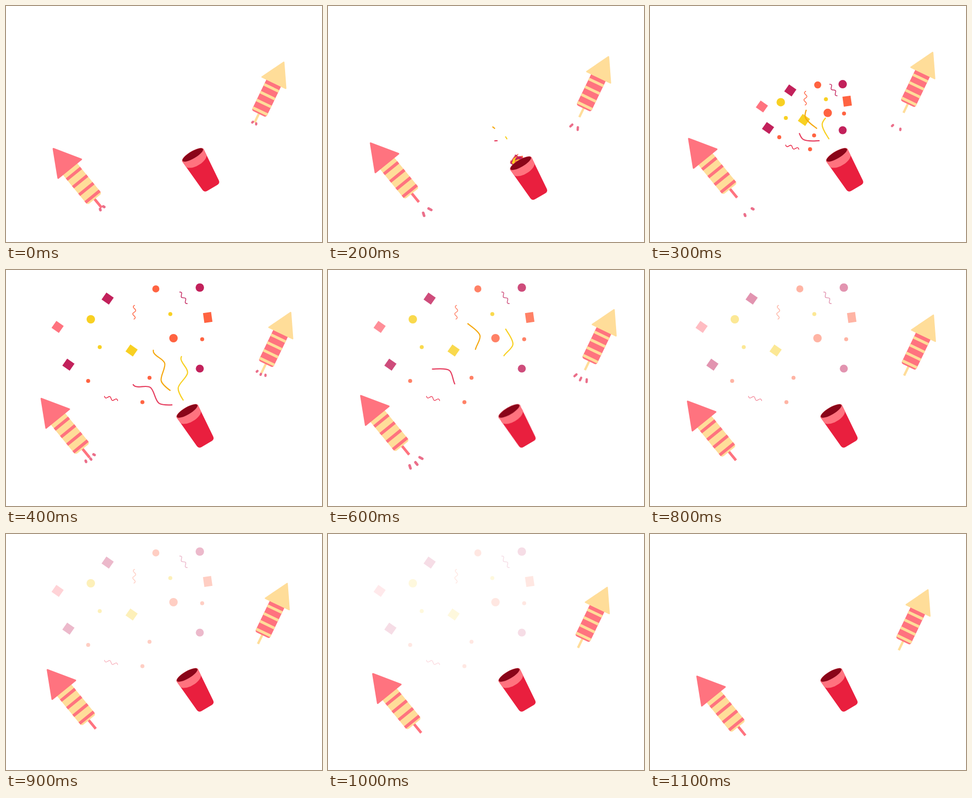
An HTML page that plays this animation: 600 by 450 pixels, repeating every 1.2 s.

```html
<!DOCTYPE html>
<html lang="en">
<head>
<meta charset="utf-8">
<title>Party popper</title>
<style>
  html, body { margin: 0; width: 100%; height: 100%; overflow: hidden; background: #fff; }
  svg { display: block; width: 100%; height: 100%; }
</style>
</head>
<body>
<svg id="stage" viewBox="0 0 600 450"></svg>
<script>
const STEP = 100, STEPS = 12;
const PINK = '#ff737f', CREAM = '#ffdd99', RED = '#e91f3e', DARK = '#8a0519', SPARK = '#eb6f8a';
const MAGENTA = '#c2215b', ORANGE = '#ff6341', YELLOW = '#f8d022', AMBER = '#f5a80f';

const stage = document.getElementById('stage');

// Motion rules; k is the step within the loop
const ramp = (k, from, to) => Math.min(1, Math.max(0, (k - from) / (to - from)));
const ease = (k, from, to) => { const u = ramp(k, from, to); return u * u * (3 - 2 * u); };
const lift = k => Math.sin(Math.PI * (k + .35) / STEPS) ** 2;
const recoil = k => Math.sin(Math.PI * ramp((k + 1) % STEPS, 0, 5)) ** 1.5;
const spread = k => ease(k, 1.8, 4);
const fade = k => k < 2 ? 0 : 1 - ramp(k, 4.8, 10.95);

function set(node, attrs) {
  for (const key in attrs) node.setAttribute(key, attrs[key]);
}

function add(parent, tag, attrs) {
  const node = document.createElementNS('http://www.w3.org/2000/svg', tag);
  set(node, attrs);
  parent.appendChild(node);
  return node;
}

const place = (x, y, angle) => `translate(${x} ${y}) rotate(${angle})`;

// Smooth path through a few points
function curve(points) {
  const at = i => points[Math.max(0, Math.min(points.length - 1, i))];
  let d = `M${points[0]}`;
  for (let i = 0; i < points.length - 1; i++) {
    const [a, b, c, e] = [at(i - 1), at(i), at(i + 1), at(i + 2)];
    const c1 = b.map((v, n) => v + (c[n] - a[n]) / 6);
    const c2 = c.map((v, n) => v - (e[n] - b[n]) / 6);
    d += `C${c1} ${c2} ${c}`;
  }
  return d;
}

function makeRocket(x, y, dx, dy, angle, scale, main, other) {
  const root = add(stage, 'g', {});
  add(root, 'rect', { x: -2.5, y: 124, width: 5, height: 23, fill: main });
  add(root, 'path', { d: 'M-17.5 48H17.5V121Q17.5 126 12.5 126H-12.5Q-17.5 126 -17.5 121Z', fill: other });
  for (let i = 0; i < 4; i++) {
    add(root, 'rect', { x: -17.5, y: 60.5 + 18.7 * i, width: 35, height: 6, fill: main });
  }
  add(root, 'path', {
    d: 'M0 2L28.3 51H-28.3Z', fill: main, stroke: main, 'stroke-width': 3, 'stroke-linejoin': 'round'
  });
  const sparks = [-1, 0, 1].map(side => ({
    side, line: add(root, 'line', { stroke: SPARK, 'stroke-width': 5, 'stroke-linecap': 'round' })
  }));

  return k => {
    const up = lift(k), age = k % 4, triple = k >= 4;
    set(root, { transform: `${place(x + dx * up, y + dy * up, angle)} scale(${scale})` });
    for (const { side, line } of sparks) {
      const half = 3 * Math.sin(Math.PI * (age + .5) / 4.2);
      const px = side * ((triple ? 10 : 4.3) + 1.7 * age);
      const py = 148 + (triple ? 9 : 11.4) * age + (side ? 0 : 2.5);
      set(line, {
        y1: -half, y2: half, transform: place(px, py, -22 * side),
        visibility: k < 8 && (triple || side) ? 'visible' : 'hidden'
      });
    }
  };
}

function makeConfetti() {
  const mouth = { x: 363, y: 301 };
  const layer = add(stage, 'g', {});
  const bits = [];

  function bit(x, y, angle, tag, attrs) {
    bits.push({ x, y, angle, node: add(layer, tag, attrs) });
  }
  function dot(x, y, r, fill) {
    bit(x, y, 0, 'circle', { r, fill });
  }
  function tile(x, y, fill, w = 17, h = 16, angle = 35) {
    bit(x, y, angle, 'rect', { x: -w / 2, y: -h / 2, width: w, height: h, fill });
  }
  function squiggle(x, y, angle, height, stroke) {
    const points = [];
    for (let t = 0; t <= 1; t += 1 / 16) points.push([27 * t - 13.5, height * Math.sin(4 * Math.PI * t)]);
    bit(x, y, angle, 'path', { d: curve(points), fill: 'none', stroke, 'stroke-width': 1.4 });
  }

  squiggle(337, 53, 55, -2.6, MAGENTA);
  squiggle(243.5, 80.5, 94, 2.6, ORANGE);
  squiggle(199.5, 245, 20, 2.6, RED);
  tile(98, 108.5, PINK);
  tile(193, 54.5, MAGENTA);
  tile(118.5, 180.5, MAGENTA);
  tile(238.5, 153.5, YELLOW);
  tile(383, 90.5, ORANGE, 15.5, 19, -8);
  dot(284.5, 36, 6.7, ORANGE);
  dot(318, 130, 8, ORANGE);
  dot(161, 94, 8, YELLOW);
  dot(368, 33.5, 8, MAGENTA);
  dot(368, 188, 7.6, MAGENTA);
  for (const [x, y] of [[312, 84], [178, 147]]) dot(x, y, 3.8, YELLOW);
  for (const [x, y] of [[372.5, 132], [156, 211.5], [272.5, 205.5], [259, 252]]) dot(x, y, 3.8, ORANGE);

  return k => {
    const p = spread(k);
    set(layer, { opacity: fade(k) });
    for (const { x, y, angle, node } of bits) {
      set(node, { transform: place(mouth.x + (x - mouth.x) * p, mouth.y + (y - mouth.y) * p, angle) });
    }
  };
}

// All streamers share one wavy shape and differ in place and direction
const ribbon = curve([[0, 0], [29, -12.5], [58, 6], [86, -6], [112, 13.5], [142, 0]]);

function makeStreamer(x, y, angle, stroke) {
  const path = add(stage, 'path', {
    d: ribbon, transform: place(x, y, angle), pathLength: 100, fill: 'none', stroke, 'stroke-width': 2.2
  });
  return k => {
    const head = 100 * ease(k, 1.5, 5.8), tail = 100 * ease(k, 3.5, 7.8);
    set(path, {
      visibility: head > tail ? 'visible' : 'hidden',
      'stroke-dasharray': `0 ${tail} ${head - tail} 200`
    });
  };
}

function makeCup() {
  const root = add(stage, 'g', {});
  add(root, 'path', { d: 'M-23.5 0L-18 67Q-17.4 73 -11.5 73H11.5Q17.4 73 18 67L23.5 0Z', fill: RED });
  add(root, 'path', { d: 'M-23.5 0L-22.4 14C-15 25 15 25 22.4 14L23.5 0Z', fill: PINK });
  add(root, 'ellipse', { rx: 23.3, ry: 7.2, fill: PINK });
  add(root, 'ellipse', { rx: 22.5, ry: 6.8, fill: DARK });
  return k => set(root, {
    transform: place(343.9 + 23.7 * recoil(k), 268.9 + 33.4 * recoil(k), -30.5)
  });
}

const parts = [
  makeRocket(89, 271, -28, -33, -39.2, 1, PINK, CREAM),
  makeRocket(528, 106, 16, -32, 25.7, .88, CREAM, PINK),
  makeConfetti(),
  makeStreamer(317, 234, -111.5, AMBER),
  makeStreamer(340, 254, -91.2, YELLOW),
  makeStreamer(322, 257, -151.3, '#e63f60'),
  makeCup()
];

let shown = -1;
const begin = performance.now();

function draw() {
  const k = Math.floor((performance.now() - begin) / STEP) % STEPS;
  if (k !== shown) parts.forEach(pose => pose(k));
  shown = k;
  requestAnimationFrame(draw);
}
draw();
</script>
</body>
</html>
```
